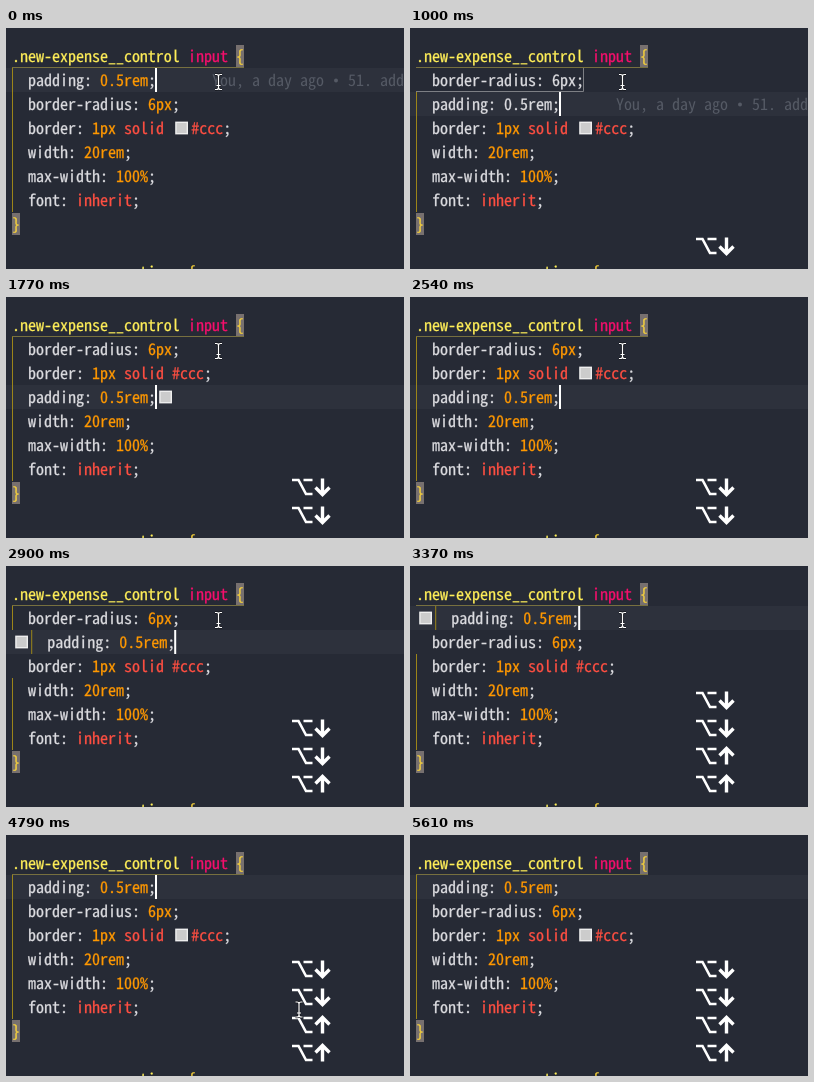
These frames come from a looping animation (398x241 px, 5710 ms). An HTML page:

```html
<!DOCTYPE html>
<html lang="en">
<head>
<meta charset="utf-8">
<title>Moving a line in a code editor</title>
<style>
  html, body { margin: 0; width: 100%; height: 100%; overflow: hidden; background: #262a35; }
  svg { display: block; }
  text {
    font: 16px "Noto Sans Mono CJK JP", "Noto Sans Mono CJK SC", "Noto Sans Mono", "DejaVu Sans Mono", monospace;
    font-size-adjust: ch-width 0.5;
    font-variant-ligatures: none;
    text-rendering: geometricPrecision;
    stroke-width: .25;
    white-space: pre;
  }
  .prop { fill: #dcdce0; stroke: #dcdce0; }
  .num { fill: #ff9800; stroke: #ff9800; }
  .word { fill: #ff4f42; stroke: #ff4f42; }
  .class { fill: #ffee58; stroke: #ffee58; }
  .tag { fill: #f50f6c; stroke: #f50f6c; }
  .brace { fill: #ffd83a; stroke: #ffd83a; }
  .blame text { fill: #555a65; stroke: none; }
  .blame circle { fill: #555a65; }
  .plain .num { fill: #dcdce0; stroke: #dcdce0; }
  .guide { fill: #9c8519; }
  .key { fill: none; stroke: #fff; }
</style>
</head>
<body>
<svg id="stage" width="398" height="241" viewBox="0 0 398 241"></svg>
<script>
const LOOP = 5710, LEFT = 6, CHAR = 8, ROW = 24, FIRST = 40, CHIP = 19.2;
const stage = document.getElementById('stage');

function add(parent, tag, attrs = {}, content) {
  const el = document.createElementNS('http://www.w3.org/2000/svg', tag);
  for (const name in attrs) el.setAttribute(name, attrs[name]);
  if (content) el.textContent = content;
  parent.append(el);
  return el;
}
const rect = (parent, x, y, width, height, attrs) =>
  add(parent, 'rect', { x, y, width, height, ...attrs });
const move = (el, x, y) => el.setAttribute('transform', `translate(${x} ${y})`);
const show = (el, on) => el.setAttribute('visibility', on ? 'visible' : 'hidden');
const rowY = i => FIRST + ROW * i;
const within = (t, spans) => spans.some(([from, to]) => t >= from && t < to);

// Tokens are [class, text] pairs laid out on the character grid.
function codeLine(row, col, ...tokens) {
  const g = add(stage, 'g');
  move(g, 0, rowY(row));
  for (const [cls, str] of tokens) {
    add(g, 'text', { x: LEFT + col * CHAR, y: 18, class: cls }, str);
    col += str.length;
  }
  return g;
}
const rule = (row, name, cls, value) =>
  codeLine(row, 2, ['prop', name + ': '], [cls, value], ['prop', ';']);

const highlight = rect(stage, 0, 0, 398, ROW, { fill: '#2d313c' });
rect(stage, LEFT, 39, 232, 1, { fill: '#77703f' });
const guides = [0, 1, 2, 3, 4, 5].map(i => rect(stage, LEFT, rowY(i), 1, ROW, { class: 'guide' }));
const strayGuide = add(stage, 'path', { d: 'M6 63.5H173.5V40', fill: 'none', stroke: '#7d7f84' });

const braceBox = { fill: '#77706f' };
rect(stage, 230, 17, 8, 22, braceBox);
rect(stage, LEFT, 185, 8, 22, braceBox);
codeLine(-1, 0, ['class', '.new-expense__control'], ['prop', ' '], ['tag', 'input'], ['prop', ' '], ['brace', '{']);
codeLine(6, 0, ['brace', '}']);
codeLine(8, 0, ['class', '.new-expense__actions'], ['prop', ' '], ['brace', '{']);

const padding = rule(0, 'padding', 'num', '0.5rem');
const radius = rule(1, 'border-radius', 'num', '6px');
const border = codeLine(2, 2, ['prop', 'border: '], ['num', '1px'], ['prop', ' '], ['word', 'solid']);
const hex = codeLine(2, 20, ['word', '#ccc'], ['prop', ';']);
rule(3, 'width', 'num', '20rem');
rule(4, 'max-width', 'num', '100%');
rule(5, 'font', 'word', 'inherit');

const chip = add(stage, 'g');
rect(chip, 3.2, 5.6, 12.8, 12.8, { fill: '#eee' });
rect(chip, 4.6, 7, 10, 10, { fill: '#ccc' });

const blame = add(stage, 'g', { class: 'blame' });
add(blame, 'text', { x: 206, y: 18 }, 'You, a day ago');
add(blame, 'circle', { cx: 330, cy: 12.5, r: 2 });
add(blame, 'text', { x: 342, y: 18 }, '51. add');

const caret = rect(stage, 149, 0, 2, ROW, { fill: '#fff' });

const keys = [[1000, 1], [1540, 1], [2900, -1], [3370, -1]].map(([at, dir]) => {
  const el = add(stage, 'g', { class: 'key' });
  add(el, 'path', { d: 'M286 -7H292.5L300 7H306.5M297.5 -7H306.5', 'stroke-width': 2.6 });
  add(el, 'path', {
    d: 'M316.5 -8.5V7M309.5 .5L316.5 7.5L323.5 .5',
    'stroke-width': 3.4,
    transform: `scale(1 ${dir})`
  });
  return { at, el };
});

const pointer = add(stage, 'g', { fill: 'none' });
const beam = 'M-3.5 -7.5H-2Q0 -7.5 0 -5.5V5.5Q0 7.5 -2 7.5H-3.5M3.5 -7.5H2Q0 -7.5 0 -5.5M0 5.5Q0 7.5 2 7.5H3.5M-2 3.5H2';
add(pointer, 'path', { d: beam, stroke: '#14161c', 'stroke-width': 2.6 });
add(pointer, 'path', { d: beam, stroke: '#fff', 'stroke-width': 1.2 });

const caretOff = [[350, 830], [1540, 1600], [2060, 2540], [3910, 4390], [4850, 5380], [5610, LOOP]];
const guideGaps = [[1000, 1240, 0], [1600, 1770, 1], [2900, 3140, 2], [3370, 3610, 1]];

function paddingRow(t) {
  if (t < 1000 || t >= 3370) return 0;
  return t >= 1600 && t < 2900 ? 2 : 1;
}

function movePointer(t) {
  const step = Math.max(0, Math.floor((t - 4390) / 57.5));
  const p = Math.min(1, step / 7) ** 1.7, q = 1 - p;
  const curve = (a, b, c) => q * q * a + 2 * q * p * b + p * p * c;
  move(pointer, curve(212.5, 245, 329), curve(54, 130, 212));
  show(pointer, step < 8);
}

function render(t) {
  const row = paddingRow(t), y = rowY(row);
  const radiusRow = row > 0 ? 0 : 1, borderRow = row > 1 ? 1 : 2;

  // The colour chip lags behind edits and sticks to the moved line.
  const chipAtEnd = t >= 1600 && t < 2010;
  const chipAtStart = t >= 2900 && t < 3850;
  const chipHome = !chipAtEnd && !chipAtStart;
  const shift = chipAtStart ? CHIP : 0;

  move(padding, shift, y);
  move(radius, 0, rowY(radiusRow));
  move(border, 0, rowY(borderRow));
  move(hex, chipHome ? CHIP : 0, rowY(borderRow));
  if (chipHome) move(chip, LEFT + 20 * CHAR, rowY(borderRow));
  else move(chip, chipAtEnd ? LEFT + 18 * CHAR : LEFT, y);

  const settling = t >= 1000 && t < 1060;
  for (const line of [padding, radius]) line.setAttribute('class', settling ? 'plain' : '');
  show(strayGuide, settling);

  move(highlight, 0, y);
  move(blame, 0, y);
  show(blame, t < 1060);
  move(caret, shift, y);
  show(caret, !within(t, caretOff));

  guides.forEach((g, i) => {
    move(g, i === row ? shift : 0, 0);
    show(g, !within(t, guideGaps.filter(gap => gap[2] === i)));
  });

  const pressed = keys.filter(k => t >= k.at).length;
  keys.forEach((k, i) => {
    show(k.el, i < pressed);
    move(k.el, 0, 218 - 28 * (pressed - 1 - i));
  });

  movePointer(t);
}

const start = performance.now();
function tick() {
  render((performance.now() - start) % LOOP);
  requestAnimationFrame(tick);
}
tick();
</script>
</body>
</html>
```
